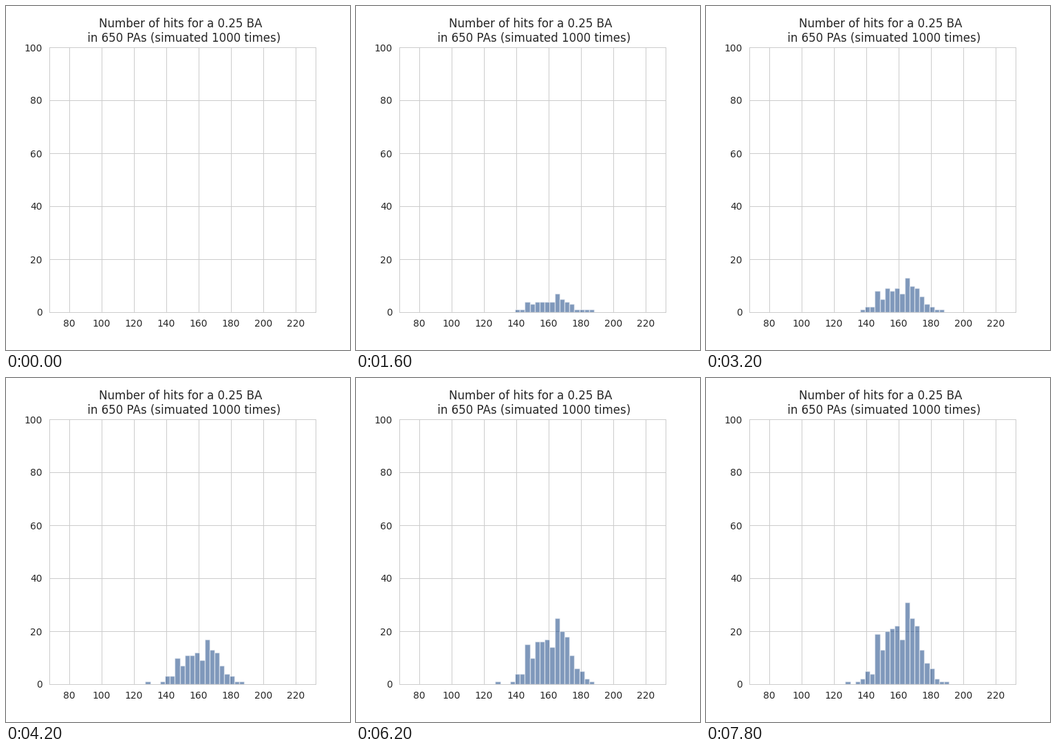
A matplotlib script for the animation above (8000 ms loop, 500x500 px).

```python
import matplotlib.pyplot as plt
import numpy as np
from matplotlib.animation import FuncAnimation

FRAMES = 40
STEP_MS = 200
PER_STEP = 6        # simulated seasons added at each step
FIRST = 17          # first bin that ever gets a hit count

# Shape of the histogram at the end of the loop, from bin FIRST on
SHAPE = [1, 0, 1, 2, 5, 4, 19, 13, 20, 21, 22,
         17, 31, 25, 22, 13, 8, 6, 2, 1, 1]

edges = np.linspace(75, 225, 50)
n_bins = len(edges) - 1


def arrivals():
    """Bins in order of arrival: each fills evenly, from its own scattered phase."""
    times = []
    for b, n in enumerate(SHAPE, FIRST):
        phase = (0.7153 * b + 0.35) % 1
        times += [((j + phase) / n, b) for j in range(n)]
    return [b for _, b in sorted(times)]


order = np.array(arrivals())


def heights(step):
    return np.bincount(order[:PER_STEP * step], minlength=n_bins)


plt.rcParams.update({
    "font.family": "DejaVu Sans",
    "text.color": "0.15",
    "axes.edgecolor": "0.8",
    "axes.linewidth": 0.72,
    "axes.axisbelow": True,
    "grid.color": "0.8",
    "grid.linewidth": 0.72,
})

fig, ax = plt.subplots(figsize=(5, 5), dpi=100)
fig.subplots_adjust(left=0.125, right=0.9, bottom=0.11, top=0.88)
ax.set_title("Number of hits for a 0.25 BA \n in 650 PAs (simuated 1000 times)",
             fontsize=12)
ax.tick_params(length=0, pad=7, labelsize=10, labelcolor="0.15")
ax.grid(True)

bars = ax.bar(edges[:-1], heights(0), width=np.diff(edges), align="edge",
              fc="#003278", ec="white", lw=1, alpha=0.5)
ax.set_xlim(67.5, 232.5)
ax.set_ylim(0, 100)
ax.set_xticks(range(80, 221, 20))
ax.set_yticks(range(0, 101, 20))


def draw(i):
    for bar, h in zip(bars, heights(i)):
        bar.set_height(h)
    return list(bars)


anim = FuncAnimation(fig, draw, frames=FRAMES, interval=STEP_MS,
                     init_func=lambda: draw(0), repeat=True, repeat_delay=0)
plt.show()
```
